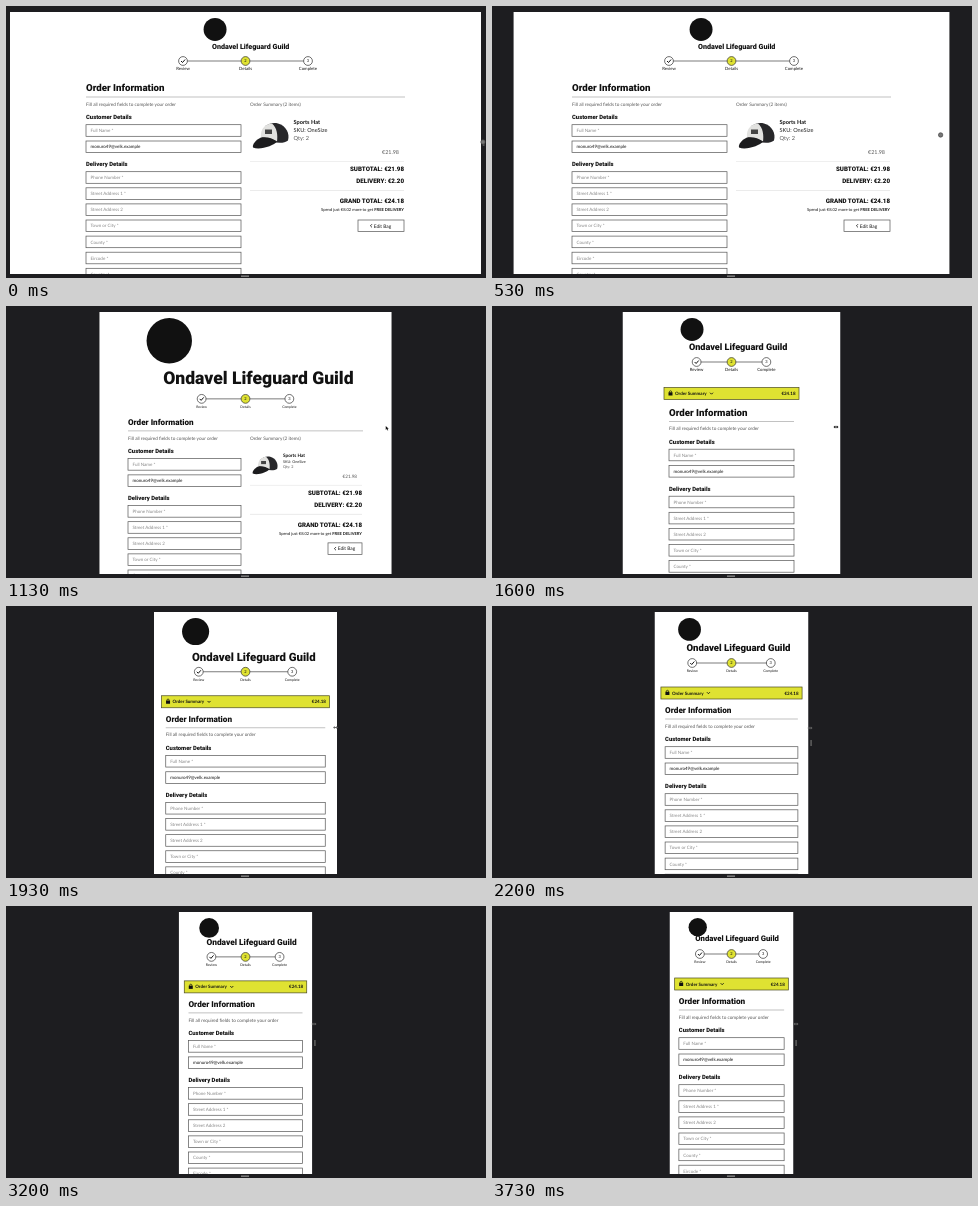
Animation of 480 by 272 pixels, one loop 3.79 s. Source, as an HTML page:

```html
<!DOCTYPE html>
<html lang="en">
<head>
<meta charset="utf-8">
<title>Responsive checkout</title>
<style>
  html, body { margin: 0; width: 100%; height: 100%; overflow: hidden; background: #1d1d20; }
  svg { display: block; width: 100vw; height: 100vh; }
  text { font-family: Lato, sans-serif; text-rendering: geometricPrecision; white-space: pre; }
  .head { font-family: Roboto, sans-serif; font-weight: 900; }
  .bold { font-weight: 700; }
</style>
</head>
<body>
<svg id="stage" viewBox="0 0 480 272"></svg>
<script>
const LOOP = 3790, STEP = 1000 / 15, CX = 239.5, TOP = 6, BOTTOM = 268;
const YELLOW = '#dfe232';

// [time, page width]
const WIDTHS = [[0, 471], [67, 471], [530, 437], [600, 422], [1130, 293], [1600, 218], [1670, 212],
  [2200, 154], [2330, 152], [2460, 152], [2930, 137], [3060, 137], [3470, 127], [3660, 127], [3730, 124]];
// [time, x, y]
const POINTER = [[0, 477, 136], [67, 477, 136], [530, 449, 129], [1130, 381, 122], [1600, 344, 121],
  [2200, 318, 122], [3200, 308, 118], [3730, 304, 118]];

function sample(keys, t, column = 1) {
  const next = keys.findIndex(key => key[0] > t);
  if (next < 0) return keys[keys.length - 1][column];
  const a = keys[next - 1], b = keys[next];
  return a[column] + (b[column] - a[column]) * (t - a[0]) / (b[0] - a[0]);
}

// y is the middle of the capital letters
function text(x, y, string, size, { fill = '#111', anchor = 'start', style = '' } = {}) {
  return `<text x="${x}" y="${y + size * .36}" font-size="${size}" fill="${fill}" text-anchor="${anchor}" class="${style}">${string}</text>`;
}
const rect = (x, y, w, h, fill, stroke = 'none') =>
  `<rect x="${x}" y="${y}" width="${w}" height="${h}" fill="${fill}" stroke="${stroke}" stroke-width=".7"/>`;
const circle = (x, y, r, fill, stroke = 'none') =>
  `<circle cx="${x}" cy="${y}" r="${r}" fill="${fill}" stroke="${stroke}" stroke-width=".7"/>`;
const path = (d, fill, stroke = 'none', width = .7) =>
  `<path d="${d}" fill="${fill}" stroke="${stroke}" stroke-width="${width}"/>`;
const rule = (x1, x2, y, color) => path(`M${x1} ${y}H${x2}`, 'none', color, .6);

// Measurements for each breakpoint; shift moves the form down
function layoutFor(w) {
  if (w >= 331) return { shift: 0, logo: 78, mark: 31, logoY: 40.5, stepY: 55, gap: 62.5,
    label: 4.3, title: 9.7, half: 159.5, columns: true, item: 1, totals: 0 };
  if (w >= 256) {
    const shift = 34 + .24 * (w - 293);
    return { shift, logo: .655 * w, mark: .21 * w, logoY: shift + 38, stepY: shift + 59, gap: .15 * w,
      label: 3.4, title: 8.1, half: 117.5, columns: true, item: .7, totals: -10 };
  }
  if (w >= 192) {
    const shift = 24.5 + .15 * (w - 218);
    return { shift, logo: .454 * w, mark: 31, logoY: shift + 16.5, stepY: shift + 31.5, gap: .16 * w,
      label: 4.3, title: 9.7, half: 62.5, bar: 67.5, barY: shift + 57 };
  }
  const shift = 22 + .3 * (w - 154), bar = w * 11 / 24;
  return { shift, logo: .68 * w, mark: .2 * w, logoY: shift + 19.7, stepY: shift + 35, gap: .255 * w,
    label: 3.5, title: 8.2, half: bar - 4.2, bar, barY: shift + 59 };
}

function logo(l) {
  const x = CX - .43 * l.logo, r = l.mark * .37;
  return circle(x + l.mark * .1, 12 + r, r, '#111') +
    text(x, l.logoY, 'Ondavel Lifeguard Guild', l.logo / 10.9, { style: 'head' });
}

function steps(l) {
  const y = l.stepY, left = CX - l.gap;
  return rule(left, CX + l.gap, y, '#222') +
    ['Review', 'Details', 'Complete'].map((name, i) => {
      const x = left + i * l.gap;
      const inside = i ? text(x, y, i + 1, 4, { anchor: 'middle' })
        : path(`M${x - 2} ${y}l1.5 1.5l2.6 -3`, 'none', '#111', 1);
      return circle(x, y, 4.4, i === 1 ? YELLOW : '#fff', '#333') + inside +
        text(x, y + 7.8, name, l.label, { anchor: 'middle' });
    }).join('');
}

function field(x, y, w, label, fill = '#888') {
  return rect(x, y - 5.8, w, 11.6, '#fff', '#555') + text(x + 4.5, y, label, 4.5, { fill });
}

function form(l) {
  const x = CX - l.half, w = l.columns ? l.half - 4.5 : l.half * 2, y = l.shift;
  const names = ['Phone Number *', 'Street Address 1 *', 'Street Address 2', 'Town or City *',
    'County *', 'Eircode *', 'Country *'];
  return text(x, y + 82, 'Order Information', l.title, { style: 'head' }) +
    rule(x, CX + l.half, y + 91, '#999') +
    text(x, y + 98, 'Fill all required fields to complete your order', 4.66, { fill: '#555' }) +
    text(x, y + 111, 'Customer Details', 5.87, { style: 'head' }) +
    field(x, y + 124.5, w, 'Full Name *') +
    field(x, y + 140.8, w, 'monuro49@velk.example', '#111') +
    text(x, y + 158, 'Delivery Details', 5.87, { style: 'head' }) +
    names.map((name, i) => field(x, y + 171.5 + 16.1 * i, w, name)).join('');
}

function hat(x, y, scale) {
  return `<g transform="translate(${x} ${y}) scale(${scale})">` +
    path('M10 17C8 6 17 0 26 2C34 4 38 12 36 19C30 24 18 20 10 17Z', '#27272a') +
    path('M9 16C8 7 14 2 20 2C25 6 26 14 25 20C19 17 14 16 9 16Z', '#e2e2e0') +
    rect(13, 8, 7, 4.5, '#444') +
    path('M9 16C4 18 0 23 1 26C8 29 22 24 25 20C20 16 14 15 9 16Z', '#1c1c1e') + '</g>';
}

function summaryColumn(l) {
  const x = CX + 4.5, right = CX + l.half - 1, y = l.shift, k = l.item, big = k === 1;
  const itemX = x + (big ? 43.5 : 33), sumY = y + l.totals, small = big ? 5.6 : 3.75;
  const total = (dy, string) => text(right, sumY + dy, string, 6.2, { anchor: 'end', style: 'head' });
  const buttonW = big ? 46 : 34, buttonX = right - buttonW, buttonY = sumY + (big ? 214 : 213);
  return text(x, y + 98, 'Order Summary (2 items)', 4.66, { fill: '#555' }) +
    hat(x + 2, y + 115.5, k) +
    text(itemX, y + 115.5, 'Sports Hat', big ? 5.6 : 4.66, { style: 'bold' }) +
    text(itemX, y + (big ? 124 : 121.5), 'SKU: OneSize', small, { fill: '#222' }) +
    text(itemX, y + (big ? 132 : 127), 'Qty: 2', small, { fill: '#555' }) +
    text(right - 5, sumY + 146, '€21.98', big ? 5.4 : 4.6, { fill: '#555', anchor: 'end' }) +
    rule(x, right, sumY + 155.5, '#e4e4e4') +
    total(163, 'SUBTOTAL: €21.98') + total(175, 'DELIVERY: €2.20') +
    rule(x, right, sumY + 184.5, '#ddd') +
    total(194.5, 'GRAND TOTAL: €24.18') +
    text(right, sumY + 203.5, 'Spend just €8.02 more to get <tspan class="bold">FREE DELIVERY</tspan>', 4.1, { anchor: 'end' }) +
    rect(buttonX, buttonY, buttonW, 11.6, '#fff', '#555') +
    text(buttonX + buttonW / 2 + 1.5, buttonY + 5.8, 'Edit Bag', 4.8, { anchor: 'middle' }) +
    path(`M${buttonX + buttonW / 2 - 9} ${buttonY + 4.2}l-1.6 1.6l1.6 1.6`, 'none', '#111', .8);
}

function summaryBar(l) {
  const x = CX - l.bar, y = l.barY, mid = y + 6;
  return rect(x, y, l.bar * 2, 12, YELLOW, '#4a4a20') +
    rect(x + 4.5, mid - 1.2, 4, 3.2, '#111') +
    path(`M${x + 5.4} ${mid - 1}v-.6a1.1 1.1 0 0 1 2.2 0v.6`, 'none', '#111') +
    text(x + 11, mid, 'Order Summary', 4.5, { style: 'bold' }) +
    path(`M${x + 46} ${mid - .8}l1.5 1.5l1.5 -1.5`, 'none', '#111', .9) +
    text(CX + l.bar - 3.5, mid, '€24.18', 4.5, { anchor: 'end', style: 'bold' });
}

function pointer(t) {
  const x = sample(POINTER, t), y = sample(POINTER, t, 2);
  if (t < 800) return circle(x, y, 2.2, '#777', '#444');
  if (t < 1400) return path(`M${x - 1} ${y - 2}v4l1 -.9l.8 1.5l.7 -.4l-.8 -1.4h1.3z`, '#111');
  return path(`M${x - 2.5} ${y}l1.7 -1.5v1h1.6v-1l1.7 1.5l-1.7 1.5v-1h-1.6v1z`, t < 1900 ? '#111' : '#666');
}

function render(t) {
  const w = sample(WIDTHS, t), left = CX - w / 2, right = CX + w / 2, l = layoutFor(w);
  const handle = t < 67 || t > 2100 ? rect(right + 1.7, 134, 1.8, 6, '#555') : '';
  return `<clipPath id="page">${rect(left, TOP, w, BOTTOM - TOP, '#fff')}</clipPath>` +
    rect(0, 0, 480, 272, '#1d1d20') +
    `<g clip-path="url(#page)">` + rect(left, TOP, w, BOTTOM - TOP, '#fff') +
    logo(l) + steps(l) + form(l) + (l.columns ? summaryColumn(l) : summaryBar(l)) + '</g>' +
    rect(235, 269.4, 8, 1.6, '#777') + handle + pointer(t);
}

const stage = document.getElementById('stage');
let shown = -1;
function tick() {
  const step = Math.floor((performance.now() % LOOP + 4) / STEP);
  if (step !== shown) {
    shown = step;
    stage.innerHTML = render(step * STEP);
  }
  requestAnimationFrame(tick);
}
tick();
</script>
</body>
</html>
```
